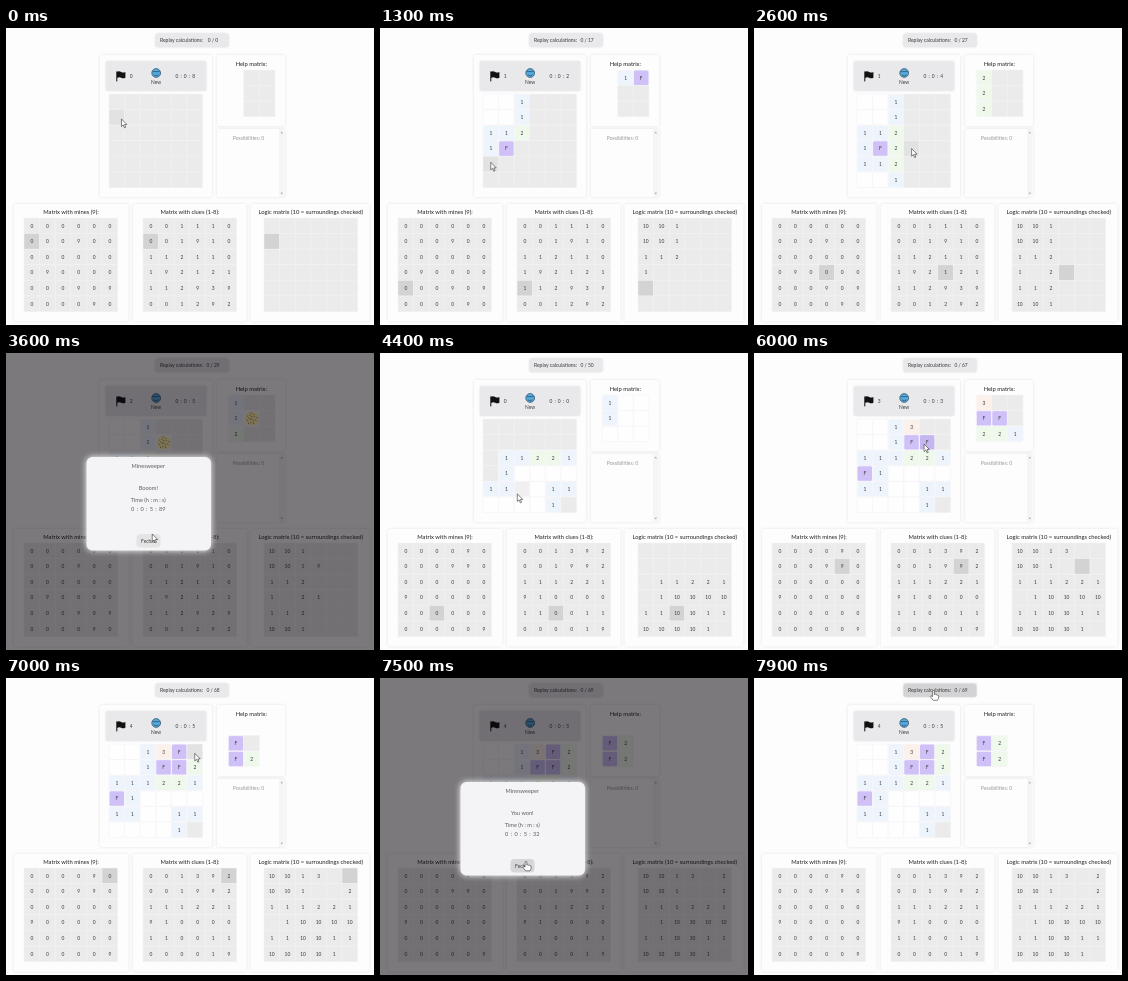
Write an HTML page that moves like this. It is 368 px wide and 297 px high and loops after 8000 ms.

```html
<!DOCTYPE html>
<html lang="en">
<head>
<meta charset="utf-8">
<title>Minesweeper</title>
<style>
  html, body { margin: 0; width: 100%; height: 100%; overflow: hidden; background: #fefdfe; }
  svg { display: block; width: 368px; height: 297px; font: 4.9px Lato, "Open Sans", sans-serif; cursor: default; }
  text { text-anchor: middle; fill: #3a3a3a; }
  .title { font-size: 5.85px; fill: #222; }
  .card { fill: #fefdfe; filter: drop-shadow(0 0 1.5px rgba(0, 0, 0, .1)); }
  .bar { fill: #e9e8ea; filter: drop-shadow(0 0 1.2px rgba(0, 0, 0, .14)); }
  .cell { stroke: #f1f1f1; stroke-width: .5; }
  .opened { stroke: #f7f6f9; stroke-width: 1; }
  .glow { fill: #f4f3f6; filter: drop-shadow(0 0 3px #fff); }
  .box { font-size: 5.6px; fill: #5c5c5c; }
  .time { word-spacing: .9px; }
  .pointer { fill: #fff; stroke: #333; stroke-width: .6; }
</style>
</head>
<body>
<svg viewBox="0 0 368 297" xmlns="http://www.w3.org/2000/svg">
  <rect id="replay" class="bar" x="149.5" y="5.5" width="73" height="13.5" rx="2.5"/>
  <text x="175.5" y="14" style="font-size:5.05px">Replay calculations:</text>
  <text id="count" x="207" y="14"></text>

  <rect class="card" x="94" y="27" width="112" height="142" rx="2"/>
  <rect class="bar" x="100" y="33.5" width="100" height="29" rx="1"/>
  <path d="M110.8 43.4V53.4" stroke="#111" stroke-width="1"/>
  <path d="M111 43.8q2.2-1 4.2.2t4.2 0v5.8q-2.2 1-4.2 0t-4.2.2z" fill="#111"/>
  <text id="flags" x="125.2" y="49.6"></text>
  <circle cx="150.2" cy="45" r="4.4" fill="#55a9dc" stroke="#2d4c62" stroke-width=".7"/>
  <path d="M146.6 43.6h7.2M147.9 46.8q2.3 2.2 4.6 0" fill="none" stroke="#1d3d55" stroke-width=".6"/>
  <text x="150" y="55.6">New</text>
  <text id="clock" class="time" x="179.2" y="49.6"></text>

  <rect class="card" x="211" y="27" width="68" height="71" rx="2"/>
  <text class="title" x="245.3" y="38">Help matrix:</text>
  <rect class="card" x="211" y="101" width="68" height="68" rx="2"/>
  <rect x="273" y="101" width="5.5" height="67.5" fill="#f5f5f5"/>
  <path d="M274.6 105.2l1.2-1.5 1.2 1.5zM274.6 164.8l1.2 1.5 1.2-1.5z" fill="#999"/>
  <text x="242.5" y="112" style="fill:#999;font-size:5.1px">Possibilities: 0</text>

  <rect class="card" x="8" y="176" width="114.5" height="117.5" rx="2"/>
  <rect class="card" x="127" y="176" width="113.5" height="117.5" rx="2"/>
  <rect class="card" x="244.5" y="176" width="119" height="117.5" rx="2"/>
  <text class="title" x="65" y="186">Matrix with mines (9):</text>
  <text class="title" x="184" y="186">Matrix with clues (1-8):</text>
  <text class="title" x="304.8" y="186">Logic matrix (10 = surroundings checked)</text>

  <g id="grids"></g>

  <g id="dialog">
    <rect width="368" height="297" fill="#08040a" opacity=".53"/>
    <rect class="glow" x="80.5" y="104" width="124.5" height="93.5" rx="6"/>
    <text class="box" x="142.3" y="115">Minesweeper</text>
    <text id="verdict" class="box" x="142.3" y="137"></text>
    <text class="box" x="142.3" y="149">Time (h : m : s)</text>
    <text id="total" class="box time" x="142.3" y="158"></text>
    <rect id="close" x="130.5" y="181" width="24" height="13.5" rx="4"/>
    <text x="142.3" y="189.7">Fechar</text>
  </g>

  <path id="arrow" class="pointer" d="M0 0V7.6L1.8 6L3 8.9L4.2 8.4L3 5.6H5.4Z"/>
  <path id="hand" class="pointer" d="M-.9.9Q0-.7.9.9V4Q2 3.2 2.6 4.3Q3.7 3.7 4.1 4.8Q5.2 4.6 5.2 5.8Q5.3 8 4 9.8H-.4Q-2 7.8-3.2 6Q-3 4.6-.9 6Z"/>
</svg>
<script>
const LOOP = 8, N = 6, SIZE = 15.6, BOARD_X = 103, BOARD_Y = 66, SPEED = 1.9;
const $ = id => document.getElementById(id);

const games = [
  { from: 0, start: .1, end: 3.2, close: 3.8, before: 8, verdict: 'Booom!', mines: [9, 19, 27, 29, 34] },
  { from: 3.8, start: 4.3, end: 7.1, close: 7.6, before: 5, verdict: 'You won!', mines: [4, 9, 10, 18, 35] }
];

// Rows and columns are fractional, so they also say where in the cell the pointer rests.
const at = (t, r, c) => ({ t, x: BOARD_X + c * SIZE, y: BOARD_Y + r * SIZE, i: Math.floor(r) * N + Math.floor(c) });
const dig = (t, r, c, cost = 1) => ({ ...at(t, r, c), cost });
const flag = (t, r, c) => ({ ...at(t, r, c), cost: 0 });
const go = (t, x, y) => ({ t, x, y });

const steps = [
  dig(.1, 1.6, .8, 16), flag(.8, 3.5, 1.5), dig(1.1, 3.5, .5), dig(1.5, 5.5, .5, 9), dig(2.2, 3.5, 2.5),
  dig(2.7, 3.5, 3.5), flag(2.9, 4.5, 3.5), dig(3.2, 1.5, 3.5), go(3.8, 146, 183),
  dig(4.3, 4.8, 2.2, 50), flag(4.7, 3.5, .5), dig(5, 1.6, 1.5, 16), dig(5.5, .6, 3.5), flag(5.7, 1.6, 3.5),
  flag(5.9, 1.6, 4.3), dig(6.3, 1.6, 5.4), flag(6.6, .6, 4.5), dig(7.1, .6, 5.5), go(7.6, 146, 183),
  go(7.7, 235, 165), go(7.9, 179.5, 12.5)
];

function around(i) {
  const r = Math.floor(i / N), c = i % N;
  return Array.from({ length: 9 }, (_, k) => {
    const y = r - 1 + Math.floor(k / 3), x = c - 1 + k % 3;
    return x < 0 || y < 0 || x >= N || y >= N ? -1 : y * N + x;
  });
}

for (const g of games)
  g.clues = Array.from({ length: N * N }, (_, i) =>
    g.mines.includes(i) ? 9 : around(i).filter(j => g.mines.includes(j)).length);

function add(tag, attrs, parent) {
  const el = document.createElementNS('http://www.w3.org/2000/svg', tag);
  for (const k in attrs) el.setAttribute(k, attrs[k]);
  return parent.appendChild(el);
}

function makeGrid(x, y, n) {
  return Array.from({ length: n * n }, (_, i) => {
    const px = x + i % n * SIZE, py = y + Math.floor(i / n) * SIZE;
    const g = add('g', { transform: `translate(${px} ${py})` }, $('grids'));
    const rect = add('rect', { width: SIZE, height: SIZE }, g);
    const text = add('text', { x: SIZE / 2, y: SIZE / 2 + 1.8 }, g);
    const mine = add('g', { fill: '#6b5a3a' }, g);
    add('circle', { cx: 8, cy: 8, r: 6.8, fill: '#fff2a8' }, mine);
    for (let k = 0; k < 16; k++) {
      const d = 1.5 * Math.sqrt(k), a = k * 2.4;
      add('circle', { cx: 8 + d * Math.cos(a), cy: 8 + d * Math.sin(a), r: .5 }, mine);
    }
    return { g, rect, text, mine };
  });
}

const board = makeGrid(BOARD_X, BOARD_Y, N);
const help = makeGrid(222.2, 42, 3);
const mineGrid = makeGrid(18, 190, N);
const clueGrid = makeGrid(137, 190, N);
const logicGrid = makeGrid(258, 190, N);

function paint(cell, fill, label, opened = false, mine = false) {
  cell.rect.setAttribute('fill', fill);
  cell.rect.setAttribute('class', opened ? 'opened' : 'cell');
  cell.rect.setAttribute('rx', opened ? 2 : 0);
  cell.text.textContent = label;
  cell.mine.style.display = mine ? '' : 'none';
}

function paintTile(cell, s, i, hot) {
  const clue = s.game.clues[i];
  if (s.flags.has(i)) return paint(cell, hot ? '#c6b6f0' : '#cfc0f8', 'F', true);
  if (!s.open.has(i)) return paint(cell, hot ? '#e2e2e2' : '#ebebeb', '');
  if (clue === 9) return paint(cell, '#f4f4f4', '', true, true);
  const fill = ['#fefefe', '#edf4fc', '#eff9eb', '#fcf0eb'][clue];
  paint(cell, hot ? '#f0f0f0' : fill, clue || '', true);
}

function reveal(s, i) {
  if (s.open.has(i) || s.flags.has(i)) return;
  s.open.add(i);
  if (!s.game.clues[i]) around(i).forEach(j => j >= 0 && reveal(s, j));
}

function stateAt(t) {
  const game = games[t < games[1].from ? 0 : 1];
  const s = { game, open: new Set(), flags: new Set(), count: 0 };
  for (const step of steps) {
    if (step.i === undefined || step.t < game.from || step.t > t) continue;
    if (step.cost) reveal(s, step.i); else s.flags.add(step.i);
    s.count += step.cost;
  }
  return s;
}

// The pointer dwells after each step, then glides to the next one with time to spare.
function pointerAt(t) {
  const k = steps.findIndex(p => p.t > t);
  if (k <= 0) return k ? steps[steps.length - 1] : steps[0];
  const a = steps[k - 1], b = steps[k], gap = b.t - a.t;
  const u = Math.min(1, Math.max(0, (t - a.t - Math.min(.1, gap * .3)) / (gap * .55)));
  const e = u * u * (3 - 2 * u);
  return { x: a.x + (b.x - a.x) * e, y: a.y + (b.y - a.y) * e };
}

const dialogOpen = t => games.some(g => t >= g.end && t < g.close);

function hoverAt(t) {
  if (dialogOpen(t)) return -1;
  const { x, y } = pointerAt(t);
  const c = Math.floor((x - BOARD_X) / SIZE), r = Math.floor((y - BOARD_Y) / SIZE);
  return c < 0 || r < 0 || c >= N || r >= N ? -1 : r * N + c;
}

function lastHover(t) {
  for (; t > 0; t -= .02) {
    const h = hoverAt(t);
    if (h >= 0) return h;
  }
  return N;
}

function render(t) {
  const s = stateAt(t), g = s.game, hot = hoverAt(t), { x, y } = pointerAt(t);
  const modal = dialogOpen(t), onReplay = !modal && y > 5 && y < 19;
  const onClose = modal && x > 130 && x < 155 && y > 181;
  const spent = (Math.min(t, g.end) - g.start) * SPEED + 1e-6;

  $('count').textContent = `0 / ${s.count}`;
  $('flags').textContent = s.flags.size;
  $('clock').textContent = `0 : 0 : ${t < g.start ? g.before : Math.floor(spent)}`;
  $('replay').style.fill = onReplay ? '#d3d2d4' : '';

  for (let i = 0; i < N * N; i++) {
    const base = i === hot ? '#d3d3d3' : '#ebebeb', clue = g.clues[i];
    paintTile(board[i], s, i, i === hot);
    paint(mineGrid[i], base, clue === 9 ? 9 : 0);
    paint(clueGrid[i], base, clue);
    paint(logicGrid[i], base, s.open.has(i) ? clue || 10 : '');
  }
  around(lastHover(t)).forEach((j, k) => {
    help[k].g.style.display = j < 0 ? 'none' : '';
    if (j >= 0) paintTile(help[k], s, j, false);
  });

  $('dialog').style.display = modal ? '' : 'none';
  $('verdict').textContent = g.verdict;
  $('total').textContent = `0 : 0 : ${Math.floor(spent)} : ${Math.floor(spent % 1 * 100)}`;
  $('close').setAttribute('fill', onClose ? '#d6d5d8' : '#e4e4e4');

  const hand = onReplay || onClose;
  $('hand').style.display = hand ? '' : 'none';
  $('arrow').style.display = hand ? 'none' : '';
  $(hand ? 'hand' : 'arrow').setAttribute('transform', `translate(${x} ${y})`);
}

const begin = performance.now();
function tick() {
  render((performance.now() - begin) / 1000 % LOOP);
  requestAnimationFrame(tick);
}
tick();
</script>
</body>
</html>
```
